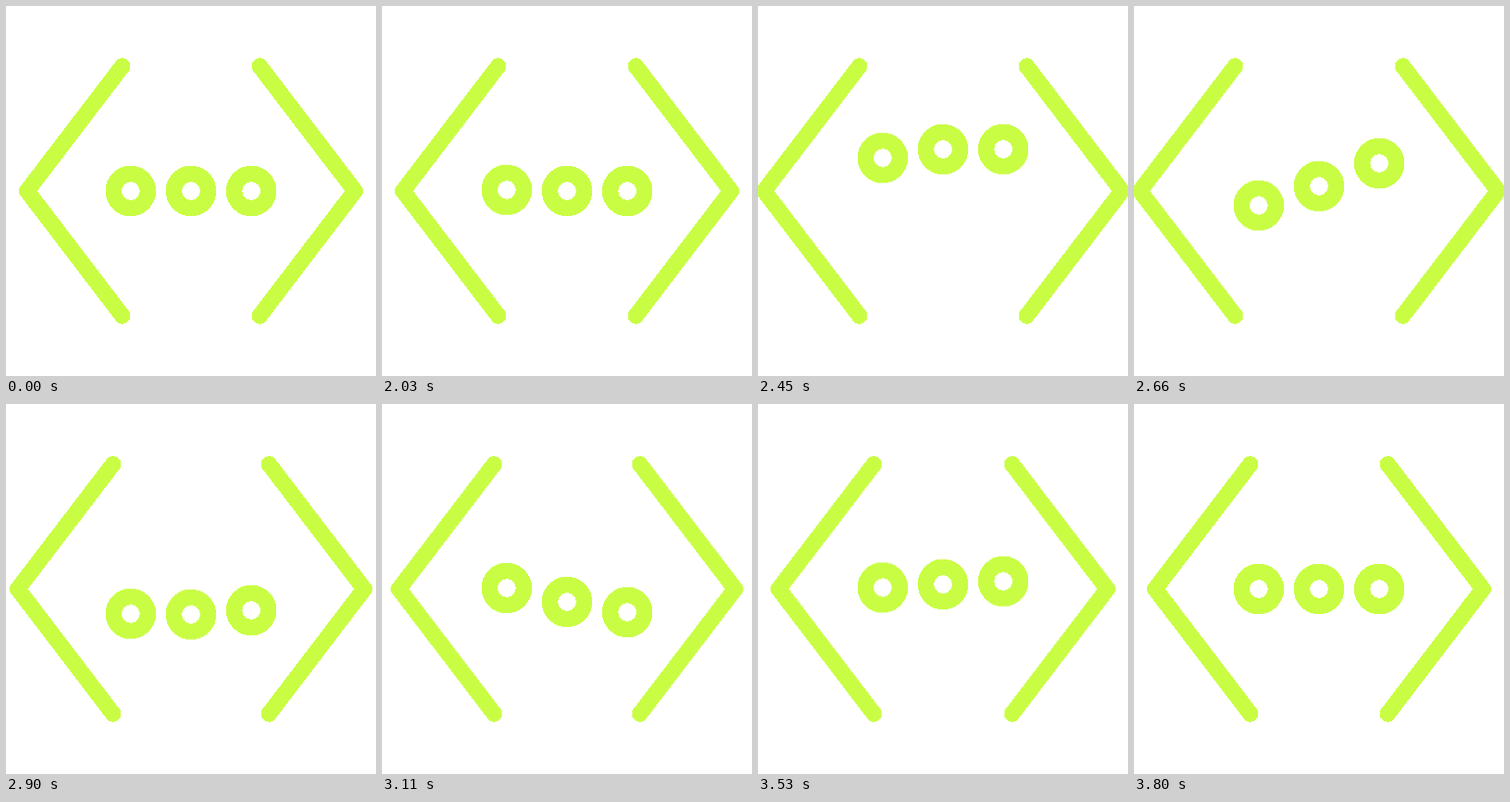
These frames come from a looping animation (400 px wide and 400 px high, 3.83 s). An HTML page:

```html
<!DOCTYPE html>
<html lang="en">
<head>
<meta charset="utf-8">
<title>Code brackets</title>
<style>
  html, body { margin: 0; width: 100%; height: 100%; overflow: hidden; background: #fff; }
  svg { display: block; width: 100%; height: 100%; }
  g { fill: none; stroke: #c9fd43; stroke-width: 17.4; stroke-linecap: round; stroke-linejoin: round; shape-rendering: crispEdges; }
  .bracket { animation: spread 1800ms both paused; }
  .dot { animation: hop 1620ms both paused; }
  .dot:nth-of-type(2) { animation-delay: 90ms; }
  .dot:nth-of-type(3) { animation-delay: 180ms; }

  @keyframes spread {
    0% { transform: translateX(0); animation-timing-function: cubic-bezier(.33, 0, .55, 1); }
    30% { transform: translateX(-17px); animation-timing-function: cubic-bezier(.33, 0, .2, 1); }
    100% { transform: translateX(0); }
  }
  @keyframes hop {
    0% { transform: translateY(0); animation-timing-function: cubic-bezier(.333, 0, .667, 1); }
    18.52% { transform: translateY(-46.5px); animation-timing-function: cubic-bezier(.5, 0, .43, 1); }
    51.85% { transform: translateY(27.8px); animation-timing-function: cubic-bezier(.5, 0, .43, 1); }
    78.7% { transform: translateY(-9.5px); animation-timing-function: cubic-bezier(.333, 0, .667, 1); }
    100% { transform: translateY(0); }
  }
</style>
</head>
<body>
<svg viewBox="0 0 400 400">
  <g>
    <path class="bracket" d="M125.8 65 22.8 200 125.8 335"/>
    <circle class="dot" cx="134.8" cy="200" r="18.6"/>
    <circle class="dot" cx="200" cy="200" r="18.6"/>
    <circle class="dot" cx="265.2" cy="200" r="18.6"/>
  </g>
  <g transform="matrix(-1 0 0 1 400 0)">
    <path class="bracket" d="M125.8 65 22.8 200 125.8 335"/>
  </g>
</svg>
<script>
  const LOOP = 3830, REST = 2000, STEP = 30;
  const parts = document.getAnimations();
  const start = performance.now();

  // Rest first, then advance the motion in 30 ms steps.
  function draw() {
    const t = (performance.now() - start) % LOOP;
    const pose = Math.max(0, Math.floor((t - REST) / STEP)) * STEP;
    for (const part of parts) part.currentTime = pose;
    requestAnimationFrame(draw);
  }
  draw();
</script>
</body>
</html>
```
